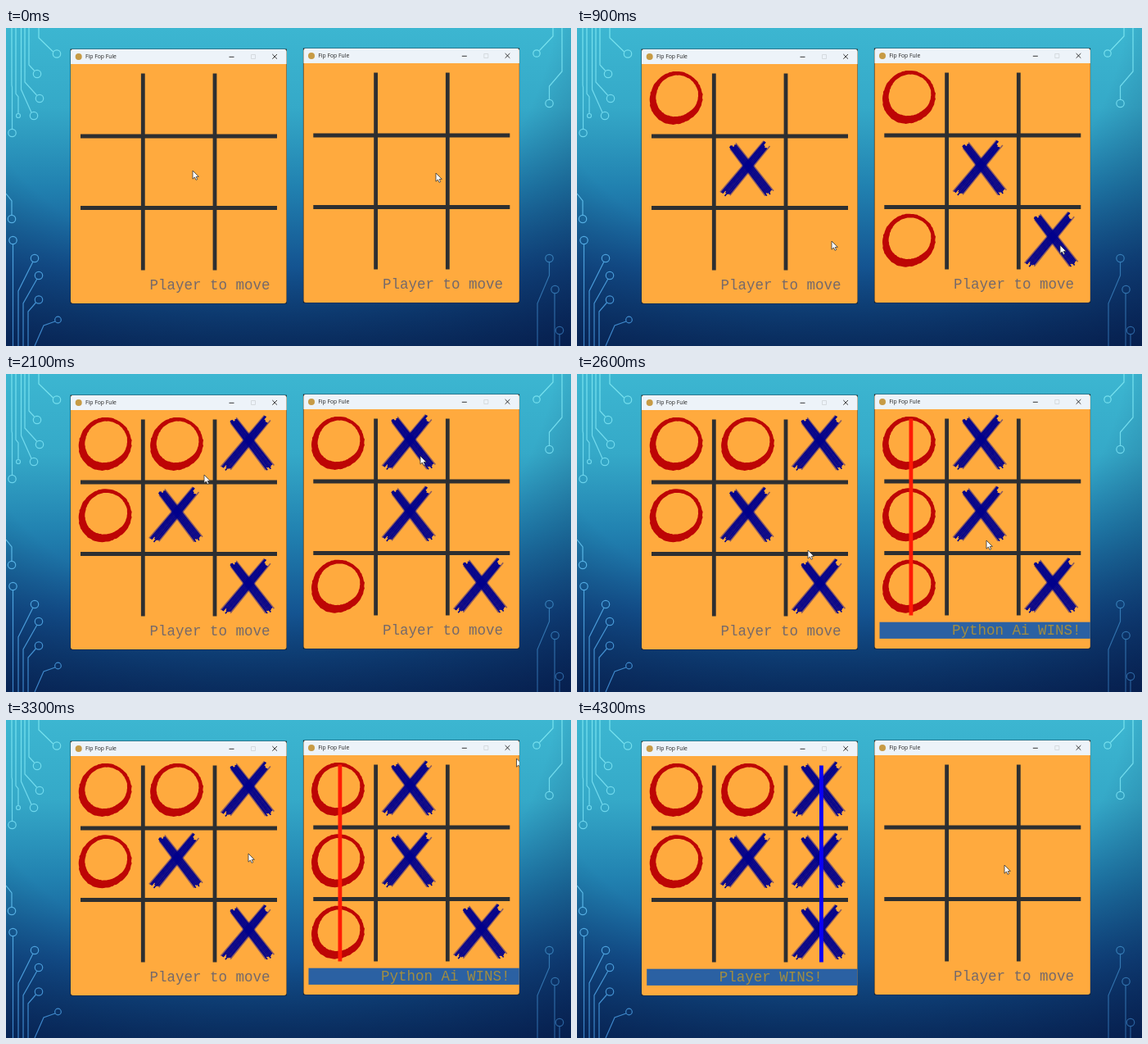
Animation, 690 px wide and 388 px high, one loop 4400 ms. Source, as an HTML page:

```html
<!DOCTYPE html>
<html lang="en">
<head>
<meta charset="utf-8">
<title>Noughts and crosses</title>
<style>
html, body { margin: 0; width: 100%; height: 100%; overflow: hidden; background: #0d4a86; }
svg { display: block; width: 100vw; height: 100vh; }
.title { font: 6.8px "Open Sans", sans-serif; fill: #222; }
.status { font: 17.5px "Liberation Mono", monospace; }
</style>
</head>
<body>
<svg id="stage" viewBox="0 0 690 388">
  <defs>
    <linearGradient id="sky" x1="0" y1="0" x2="0" y2="1">
      <stop offset="0" stop-color="#3cb6d1"/>
      <stop offset=".25" stop-color="#35a9c8"/>
      <stop offset=".5" stop-color="#2181b0"/>
      <stop offset=".75" stop-color="#145491"/>
      <stop offset="1" stop-color="#0b3568"/>
    </linearGradient>
    <radialGradient id="shade" gradientUnits="userSpaceOnUse" cx="0" cy="0" r="1"
      gradientTransform="translate(300 -40) scale(620 560)">
      <stop offset=".6" stop-color="#04123f" stop-opacity="0"/>
      <stop offset="1" stop-color="#04123f" stop-opacity=".65"/>
    </radialGradient>
    <linearGradient id="wire" gradientUnits="userSpaceOnUse" x1="0" y1="0" x2="0" y2="388">
      <stop offset="0" stop-color="#7ce6f0"/>
      <stop offset=".35" stop-color="#6fd6ee"/>
      <stop offset=".65" stop-color="#55aee6"/>
      <stop offset="1" stop-color="#3d86cc"/>
    </linearGradient>
    <clipPath id="frame"><rect x="79" y="26" width="263.5" height="310" rx="3"/></clipPath>
    <g id="o"></g>
    <g id="x" stroke="#00008c"></g>
    <path id="arrow" d="M0 0V10.2L2.4 8 4 11.4 5.7 10.6 4.2 7.4H7.3Z" fill="#fff" stroke="#333" stroke-width=".8" stroke-linejoin="round"/>
  </defs>
  <rect width="690" height="388" fill="url(#sky)"/>
  <rect width="690" height="388" fill="url(#shade)"/>
  <g id="wires" fill="none" stroke="url(#wire)" stroke-width="1.2"></g>
</svg>
<script>
const LOOP = 4400, STEP = 100;
const NS = "http://www.w3.org/2000/svg";
const $ = id => document.getElementById(id);

function add(parent, tag, attrs, text) {
  const el = document.createElementNS(NS, tag);
  for (const k in attrs) el.setAttribute(k, attrs[k]);
  if (text) el.textContent = text;
  return parent.appendChild(el);
}
const show = (el, on) => el.setAttribute("visibility", on ? "visible" : "hidden");

let seed = 7;
const rand = () => (seed = seed * 16807 % 2147483647) / 2147483647;

// Circuit traces: path, pad x, pad y, pad radius
const traces = [
  ["M57.5 29L40 12V0", 62, 31.5, 4.7],
  ["M34.5 52L28 45V0", 38, 56, 4.7],
  ["M37.5 82L23 66V0", 41, 86, 4.7],
  ["M31 103L18.5 75V0", 34, 107, 4.7],
  ["M15 104.5V84L12 80V0", 15, 107, 2.5],
  ["M7.5 123V72L7 70V0", 7.5, 128, 4.7],
  ["M7 228V211L0 202", 7, 233, 4.7],
  ["M8.5 264V388", 8.5, 259, 4.7],
  ["M33 285L15 321V388", 35, 281, 4.7],
  ["M38 306L21 336V388", 40, 302, 4.7],
  ["M36.5 335L27 346V388", 40, 331.5, 4.7],
  ["M60 358L46 363L35 388", 63.5, 356, 3.8],
  ["M651.5 27.5L668 10V0", 648, 31, 4.2],
  ["M663.5 87V71L679 53V0", 663.5, 92, 4.7],
  ["M663.5 286V302L649 336V388", 663.5, 281, 4.7],
  ["M670 324V388", 670.5, 319, 4.7],
  ["M676 373.5V388", 676, 369, 4.7]
];
for (const [d, cx, cy, r] of traces) {
  const g = add($("wires"), "g", { opacity: cx > 600 && cy > 200 ? 0.6 : 0.95 });
  add(g, "path", { d });
  add(g, "circle", { cx, cy, r });
}

// Brushed ring: a wobbly outline, drawn out to the upper right, with an off-centre hole
function loop(cx, cy, rx, ry, rough) {
  const pts = [];
  for (let i = 0; i < 90; i++) {
    const a = i / 90 * Math.PI * 2;
    const k = 1 - 0.03 * Math.sin(2 * a) + 0.012 * Math.sin(3 * a + 1) + (rand() - 0.5) * rough;
    pts.push((cx + rx * k * Math.cos(a)).toFixed(1) + " " + (cy + ry * k * Math.sin(a)).toFixed(1));
  }
  return "M" + pts.join("L") + "Z";
}
add($("o"), "path", {
  d: loop(0, 0, 32.3, 32.2, 0.025) + loop(1.2, -2.4, 25.8, 25.2, 0.02),
  fill: "#bd0505", "fill-rule": "evenodd"
});

// Brushed cross: each arm is a bundle of ragged bristles
function arm(x1, y1, x2, y2) {
  const len = Math.hypot(x2 - x1, y2 - y1), ux = (x2 - x1) / len, uy = (y2 - y1) / len;
  for (let i = -4; i <= 4; i++) {
    const a = rand() * 6 - 3, b = rand() * 6 - 3, start = i * 1.2, end = i * 1.45;
    const outer = Math.abs(i) === 4;
    add($("x"), "line", {
      x1: x1 - uy * start + ux * a, y1: y1 + ux * start + uy * a,
      x2: x2 - uy * end - ux * b, y2: y2 + ux * end - uy * b,
      "stroke-width": 1.6, opacity: outer ? 0.45 : 1
    });
  }
}
arm(-18, -29, 26, 28);
arm(22, -30, -27, 29);

const ease = k => k * k * (3 - 2 * k);
function along(keys, t) {
  let i = 1;
  while (i < keys.length - 1 && t > keys[i][0]) i++;
  const [t0, x0, y0] = keys[i - 1], [t1, x1, y1] = keys[i];
  const k = ease(Math.min(1, Math.max(0, (t - t0) / (t1 - t0))));
  return [x0 + (x1 - x0) * k, y0 + (y1 - y0) * k];
}

function makeGame({ dx, dy, moves, win, reset, keys, hide }) {
  const root = add($("stage"), "g", { transform: `translate(${dx} ${dy})` });
  add(root, "rect", { x: 78.6, y: 25.6, width: 264.2, height: 310.8, fill: "#15202e" });
  const pane = add(root, "g", { "clip-path": "url(#frame)" });
  add(pane, "rect", { x: 79, y: 26, width: 264, height: 310, fill: "#ffaa3e" });
  add(pane, "rect", { x: 79, y: 26, width: 264, height: 18, fill: "#edf3f9" });
  add(pane, "circle", { cx: 88.7, cy: 35, r: 4, fill: "#c79b45" });
  add(pane, "text", { x: 97, y: 37.4, class: "title" }, "Fip Fop Fule");
  const icon = (d, stroke) => add(pane, "path", { d, stroke, fill: "none", "stroke-width": 0.9 });
  icon("M272.5 35.3H278.5", "#222");
  icon("M299.5 32.5H304.5V37.5H299.5Z", "#d3d7dc");
  icon("M325.3 32L331 37.7M331 32L325.3 37.7", "#222");
  add(pane, "path", {
    d: "M167.3 55.5V295.5M255 55.5V295.5M91 132H331M91 219.5H331",
    stroke: "#2d2f31", "stroke-width": 4.8
  });

  const marks = moves.map(([at, kind, row, col]) => ({
    at, el: add(pane, "use", { href: "#" + kind, x: 120.8 + 87.4 * col, y: 85.4 + 87.4 * row })
  }));
  const turn = add(pane, "text", { x: 175.6, y: 319, class: "status", fill: "#75696a" }, "Player to move");
  const banner = add(pane, "g", {});
  const lineX = 123.6 + 87.4 * win.col;
  add(banner, "path", { d: `M${lineX} 55.5V295.5`, stroke: win.color, "stroke-width": 4.8 });
  add(banner, "rect", { x: 85.2, y: 303.7, width: 258, height: 20.2, fill: "#2b61a3" });
  add(banner, "text", { x: 173.8, y: 319, class: "status", fill: "#a08d42" }, win.text);
  const cursor = add(pane, "use", { href: "#arrow" });

  return t => {
    const live = t < reset, won = live && t >= win.at;
    for (const m of marks) show(m.el, live && t >= m.at);
    show(turn, !won);
    show(banner, won);
    const [x, y] = along(keys, t);
    cursor.setAttribute("x", x - dx);
    cursor.setAttribute("y", y - dy);
    show(cursor, t < hide);
  };
}

const games = [
  makeGame({
    dx: 0, dy: 0, reset: LOOP, hide: 4300,
    moves: [[300, "x", 1, 1], [500, "o", 0, 0], [1000, "x", 2, 2], [1200, "o", 0, 1],
            [1800, "x", 0, 2], [2000, "o", 1, 0], [3500, "x", 1, 2]],
    win: { at: 3500, col: 2, color: "#0a00f5", text: "Player WINS!" },
    keys: [[0, 228, 174], [300, 214, 170], [500, 218, 174], [900, 311, 260], [1100, 308, 258],
           [1500, 212, 154], [1800, 290, 90], [2100, 242, 123], [2600, 282, 215],
           [3300, 296, 163], [4200, 304, 164]]
  }),
  makeGame({
    dx: 284.3, dy: -1, reset: 3900, hide: LOOP,
    moves: [[200, "x", 1, 1], [400, "o", 0, 0], [700, "x", 2, 2], [800, "o", 2, 0],
            [1800, "x", 0, 1], [2400, "o", 1, 0]],
    win: { at: 2400, col: 0, color: "#ff1a05", text: "Python Ai WINS!" },
    keys: [[0, 525, 177], [200, 510, 174], [400, 512, 178], [700, 588, 262], [900, 590, 265],
           [1500, 499, 66], [1800, 497, 78], [2100, 506, 100], [2600, 500, 203],
           [3300, 623.5, 47], [3600, 634, 42], [4200, 525, 176], [4300, 522, 177]]
  })
];

function draw() {
  const t = Math.floor(performance.now() % LOOP / STEP) * STEP;
  for (const update of games) update(t);
  requestAnimationFrame(draw);
}
draw();
</script>
</body>
</html>
```
